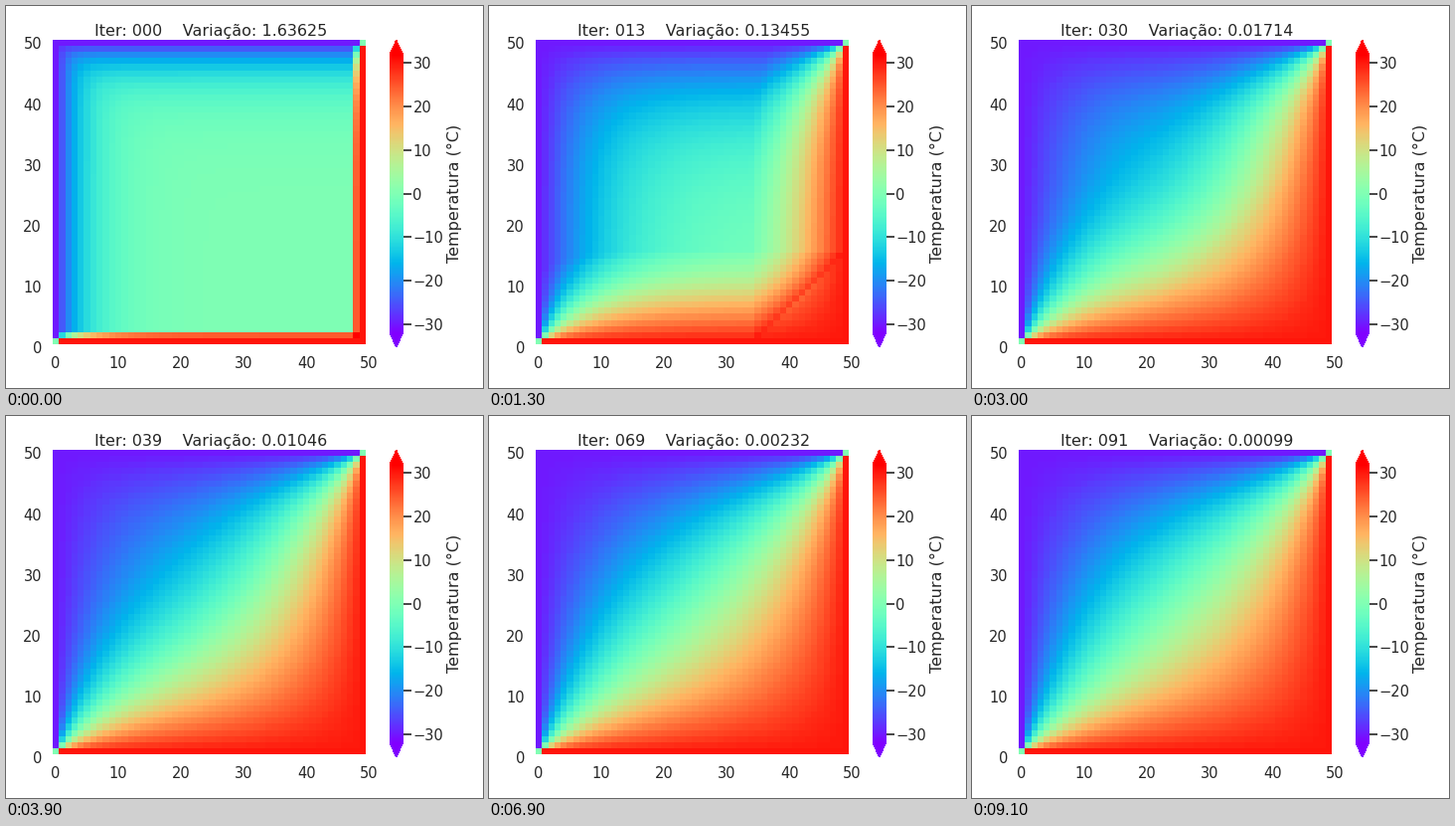
A matplotlib script for the animation above (9.2 s loop, 480 px wide and 384 px high).

```python
import numpy as np
import matplotlib.pyplot as plt
from matplotlib.animation import FuncAnimation

WIDTH, HEIGHT, DPI = 480, 384, 96
N = 50            # cells per side
HOT, COLD = 30, -30
OMEGA = 1.8       # over-relaxation factor
ITERATIONS = 92
INK = "0.15"


def initial_plate():
    plate = np.zeros((N, N))
    plate[0, :-1] = plate[:-1, 0] = COLD
    plate[-1, 1:] = plate[1:, -1] = HOT
    return plate


def sweep(plate):
    """One in-place SOR pass from the top left to the bottom right."""
    u = plate.tolist()
    for i in range(1, N - 1):
        above, row, below = u[i - 1], u[i], u[i + 1]
        for j in range(1, N - 1):
            neighbours = above[j] + below[j] + row[j - 1] + row[j + 1]
            row[j] = (1 - OMEGA) * row[j] + OMEGA * neighbours / 4
    return np.array(u)


def solve():
    plates, changes = [], []
    old = initial_plate()
    for _ in range(ITERATIONS):
        new = sweep(old)
        changes.append(np.abs(new - old).max() / np.abs(old).max())
        plates.append(new)
        old = new
    return plates, changes


def pixel_axes(left, top, right, bottom):
    return fig.add_axes([left / WIDTH, 1 - bottom / HEIGHT,
                         (right - left) / WIDTH, (bottom - top) / HEIGHT])


def points(pixels):
    return pixels * 72 / DPI


plates, changes = solve()

plt.rcParams.update({
    "font.family": "DejaVu Sans", "text.color": INK,
    "xtick.color": INK, "ytick.color": INK,
    "xtick.labelsize": 11, "ytick.labelsize": 11,
})
fig = plt.figure(figsize=(WIDTH / DPI, HEIGHT / DPI), dpi=DPI, facecolor="white")

ax = pixel_axes(47, 34.4, 365.15, 342.9)
image = ax.imshow(plates[0], cmap="rainbow", vmin=-32, vmax=32,
                  aspect="auto", interpolation="nearest")
ticks = np.arange(0, N + 1, 10)
ax.set_xticks(ticks)
ax.set_yticks(ticks, [str(N - t) for t in ticks])
ax.set_xlim(-0.5, N)
ax.set_ylim(N, -0.5)
ax.tick_params(axis="x", length=0, pad=7)
ax.tick_params(axis="y", length=0, pad=points(11))
ax.spines[:].set_visible(False)
title = ax.set_title("", fontsize=12, y=1, pad=points(4.2))

bar = fig.colorbar(image, cax=pixel_axes(386, 34.4, 399.5, 342.9),
                   extend="both", ticks=np.arange(-30, 31, 10))
bar.outline.set_visible(False)
bar.ax.tick_params(length=6, width=1.25, pad=points(2))
fig.text(459 / WIDTH, 1 - 188.5 / HEIGHT, "Temperatura (°C)", fontsize=12,
         rotation=90, ha="right", va="center")


def draw(k):
    image.set_data(plates[k])
    title.set_text(f"Iter: {k:03d}    Variação: {changes[k]:.5f}")
    return image, title


animation = FuncAnimation(fig, draw, frames=ITERATIONS, interval=100,
                          init_func=lambda: draw(0), repeat=True)
plt.show()
```
